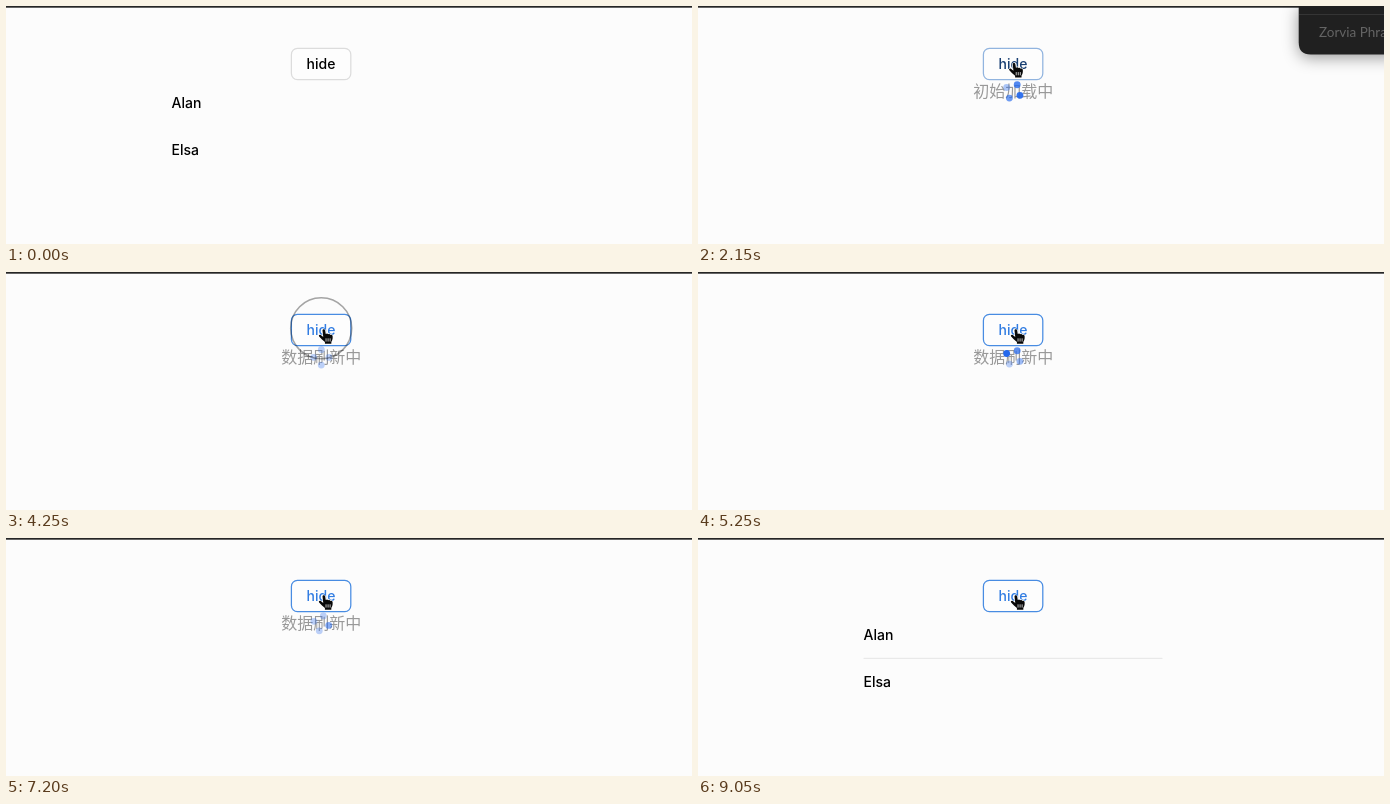
Animation, 686 px wide and 238 px high, one loop 9100 ms. Source, as an HTML page:

```html
<!DOCTYPE html>
<html lang="zh-CN">
<head>
<meta charset="utf-8">
<title>Loading states</title>
<style>
  html, body { margin: 0; width: 100%; height: 100%; overflow: hidden; background: #fcfcfc; }
  svg { display: block; width: 686px; height: 238px; }
  text { font: 450 14px Inter, Roboto, sans-serif; fill: #000; }
  #status { font: 16px "Noto Sans CJK SC", "Noto Sans CJK", sans-serif; fill: #999; }
  #brand { font: 13.5px Lato, "Open Sans", sans-serif; fill: #646464; }
  #popup { filter: drop-shadow(0 3px 8px #0006); }
</style>
</head>
<body>
<svg viewBox="0 0 686 238">
  <rect width="686" height="238" fill="#fcfcfc"/>
  <rect width="686" height="1.7" fill="#252525"/>

  <rect id="border" x="285.4" y="42.4" width="59.4" height="31.2" rx="6" fill="#fdfdfd" stroke-width="1.25"/>
  <text id="label" x="315" y="63" text-anchor="middle">hide</text>

  <g id="list">
    <text x="165.5" y="102">Alan</text>
    <text x="165.5" y="149">Elsa</text>
    <path id="divider" d="M165.5 120.4H464.5" stroke="#e9e9e9" stroke-width="1.2"/>
  </g>

  <g id="loading">
    <text id="status" x="315.3" y="91" text-anchor="middle"></text>
    <g id="dots" fill="#2468ec"></g>
  </g>

  <g id="popup">
    <path d="M600.7 0H700V48.5H612.7Q600.7 48.5 600.7 36.5Z" fill="#202020"/>
    <path d="M601 8.5H686" stroke="#353535"/>
    <text id="brand" x="621" y="30.5">Zorvia Phrasebook</text>
  </g>

  <circle id="ring" cx="315.2" cy="56.3" r="30.5" fill="none" stroke="#0a0a0a" stroke-width="1.6"/>

  <path id="arrow" d="M0 0V14.5L3.3 11.4L5.6 16.6L8 15.5L5.8 10.5H10.2Z" stroke="#fff" stroke-width="1.1" paint-order="stroke"/>
  <g id="hand">
    <path d="M0 1.2C0-.6 2.6-.7 2.9 1L3.5 4.8C4.3 3.9 5.8 4.1 6.1 5.1C7 4.5 8.2 4.9 8.5 5.8C9.6 5.3 10.8 6 10.9 7.2C11.2 10.2 10.2 12 9.5 13.2V15.3H2.6V13.5C.6 12.1-1.7 9.5-3.6 7.6C-4.6 6.2-2.9 5.1-1.5 6.2L.8 8Z"
      fill="#080808" stroke="#fff" stroke-width="1.4" paint-order="stroke"/>
    <path d="M3.8 9.5V13M6 9.5V13M8.2 9.5V13" stroke="#fff" stroke-width=".8"/>
  </g>
</svg>
<script>
const LOOP = 9100;
const LOADS = [
  { from: 850, to: 2750, text: '初始加载中' },
  { from: 4250, to: 6100, text: '数据刷新中' },
  { from: 6850, to: 8700, text: '数据刷新中' }
];
const LIST = [[0, 850], [2750, 3650], [6100, 6680], [8700, LOOP]];
const PRESSES = [[3400, 3650], [3900, 4200], [6500, 6680], [6740, 6850]];
const HOVER_AT = 2050;

const $ = id => document.getElementById(id);
const clamp = v => Math.max(0, Math.min(1, v));
const progress = (t, from, to) => clamp((t - from) / (to - from));
const smooth = u => u * u * (3 - 2 * u);
const mix = (a, b, u) => a + (b - a) * u;
const blend = (a, b, u) => `rgb(${a.map((v, i) => mix(v, b[i], u))})`;
const inside = t => ([from, to]) => t >= from && t < to;
const show = (id, visible) => $(id).setAttribute('visibility', visible ? 'visible' : 'hidden');

const dots = Array.from({ length: 4 }, () => {
  const dot = document.createElementNS('http://www.w3.org/2000/svg', 'circle');
  dot.setAttribute('r', 3.4);
  return $('dots').appendChild(dot);
});

function drawSpinner(seconds) {
  dots.forEach((dot, i) => {
    const angle = (-90 + 90 * i + 300 * seconds) * Math.PI / 180;
    const phase = Math.max(0, seconds - 0.4 * i) % 2;
    dot.setAttribute('cx', 315.3 + 7.7 * Math.cos(angle));
    dot.setAttribute('cy', 85.4 + 7.7 * Math.sin(angle));
    dot.setAttribute('opacity', 0.3 + 0.7 * (1 - Math.abs(1 - phase)));
  });
}

function drawCursor(t) {
  const enter = smooth(progress(t, 850, 1150));
  const travel = smooth(progress(t, 1250, 2200));
  const x = mix(mix(64, 82, enter), 316.5, travel);
  const y = mix(mix(18, 25, enter), 57.5, travel);
  const hovering = t >= HOVER_AT;
  show('arrow', t >= 850 && !hovering);
  show('hand', hovering);
  $('arrow').setAttribute('transform', `translate(${x} ${y})`);
  $('hand').setAttribute('transform', `translate(${x} ${y}) scale(.93)`);
}

function draw(t) {
  const hover = progress(t, HOVER_AT, HOVER_AT + 200);
  $('border').setAttribute('stroke', blend([220, 220, 220], [72, 140, 226], hover));
  $('label').style.fill = blend([0, 0, 0], [50, 125, 226], hover);

  show('list', LIST.some(inside(t)));
  $('divider').setAttribute('opacity', t < 850 ? 0 : 1);

  const load = LOADS.find(({ from, to }) => inside(t)([from, to]));
  show('loading', load);
  if (load) {
    $('status').textContent = load.text;
    drawSpinner((t - load.from) / 1000);
  }

  $('popup').setAttribute('opacity', progress(t, 800, 900) * (1 - progress(t, 3280, 3480)));
  $('ring').setAttribute('opacity', Math.max(...PRESSES.map(([down, up]) =>
    t < down ? 0 : 1 - progress(t, up, up + 80))));
  drawCursor(t);
}

const start = performance.now();
function tick() {
  draw((performance.now() - start) % LOOP);
  requestAnimationFrame(tick);
}
tick();
</script>
</body>
</html>
```
